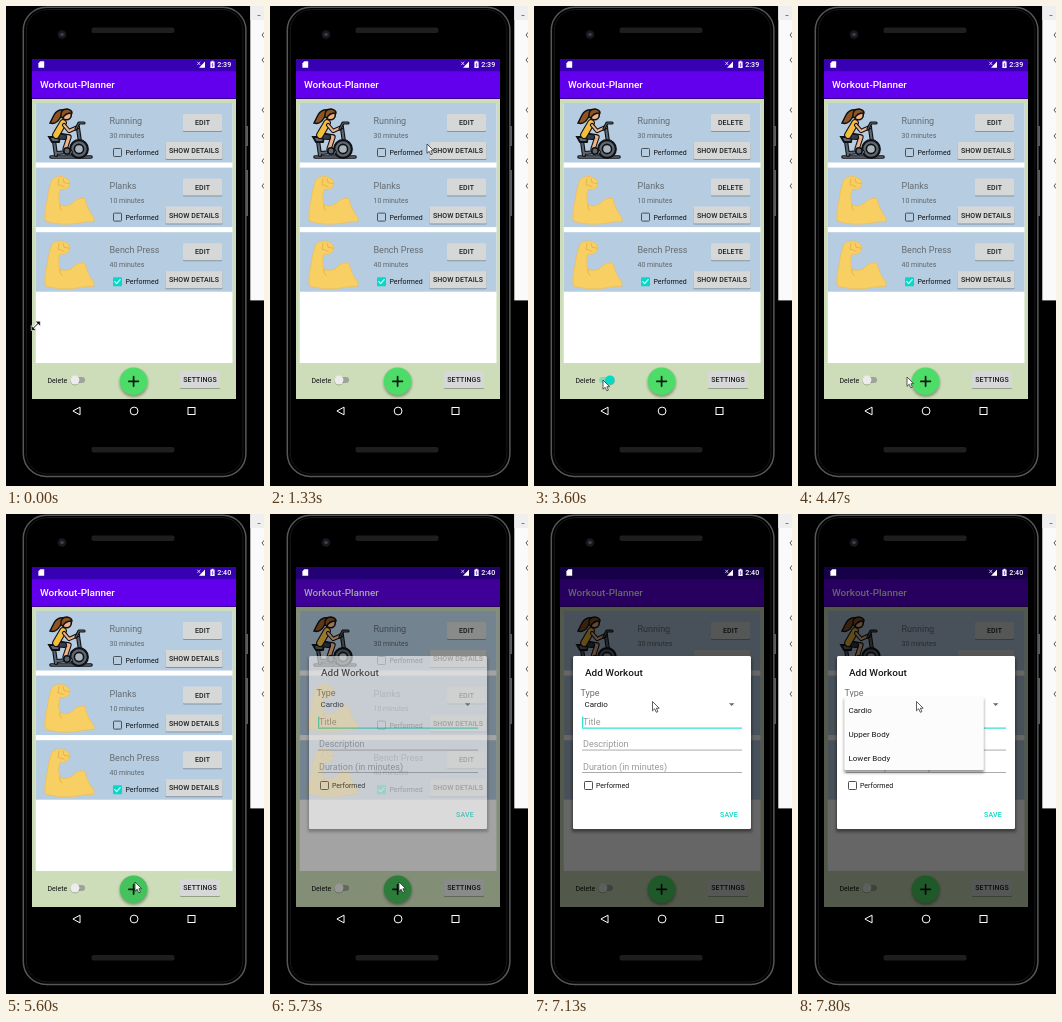
These frames come from a looping animation (258x480 px, 8000 ms). An HTML page:

```html
<!DOCTYPE html>
<html lang="en">
<head>
<meta charset="utf-8">
<title>Workout planner</title>
<style>
html, body { margin: 0; width: 100%; height: 100%; overflow: hidden; background: #000; }
svg { display: block; width: 100vw; height: 100vh; font-family: Roboto, "Open Sans", sans-serif; font-size: 7px; }
.med { font-weight: 500; }
.mid { text-anchor: middle; }
.line { fill: none; stroke-linecap: round; stroke-linejoin: round; }
.soft { filter: blur(1.6px); }
</style>
</head>
<body>
<svg id="stage" viewBox="0 0 258 480" preserveAspectRatio="none"></svg>
<script>
const LOOP = 8000, ROW = 64.6, TEAL = '#03dac5';
const stage = document.getElementById('stage');

const rect = (x, y, w, h, fill, more = '') =>
  `<rect x="${x}" y="${y}" width="${w}" height="${h}" fill="${fill}" ${more}/>`;
const circle = (x, y, r, fill, more = '') =>
  `<circle cx="${x}" cy="${y}" r="${r}" fill="${fill}" ${more}/>`;
const path = (d, fill, more = '') => `<path d="${d}" fill="${fill}" ${more}/>`;
const line = (d, color, w) => path(d, 'none', `class="line" stroke="${color}" stroke-width="${w}"`);
const text = (x, y, s, fill = '#111', size = 7, more = '') =>
  `<text x="${x}" y="${y}" fill="${fill}" font-size="${size}" ${more}>${s}</text>`;
const group = (id, body, more = '') => `<g id="${id}" ${more}>${body}</g>`;

function button(x, y, w, label, cls = '') {
  return rect(x, y + 0.8, w, 17.2, '#000', 'rx="1" opacity=".28"') +
    rect(x, y, w, 17, '#d6d7d7', 'rx="1"') +
    text(x + w / 2, y + 11.1, label, '#1c1c1c', 7, `class="med mid ${cls}" letter-spacing=".08"`);
}

function checkbox(x, y, s, on) {
  return on
    ? rect(x, y, s, s, TEAL, 'rx="1"') +
      line(`M${x + 1.8} ${y + s / 2}l1.8 2 3.6-4`, '#fff', 1.1)
    : rect(x + .5, y + .5, s - 1, s - 1, 'none', 'rx=".8" stroke="#4c5054"');
}

// Woman on an exercise bike
function bike() {
  const K = '#101114', SKIN = '#efb388', STEEL = '#5d6873';
  const limb = (d, c, w) => line(d, K, w + 2.2) + line(d, c, w);
  return limb('M45 151H85', STEEL, 1.4) +
    limb('M50 149L48 135M51 147L62 146L74 136L72 122', STEEL, 2) +
    circle(73, 143, 8.8, STEEL, `stroke="${K}" stroke-width="2.2"`) +
    circle(73, 143, 4.6, '#a9b4be', `stroke="${K}" stroke-width="1.6"`) +
    path('M43 131H54L53 136H46Z', STEEL, `stroke="${K}" stroke-width="1.8"`) +
    limb('M51 129L63 131L59 143L64 146', SKIN, 3.2) +
    limb('M50 130L58 131', '#343d48', 4) +
    limb('M57 117L50 129', '#f4bd3d', 5.5) +
    limb('M58 119L63 125L72 121', SKIN, 2) +
    limb('M70 123L73 117L78 117', STEEL, 1) +
    path('M59 104Q51 103 48 109L44 117Q50 119 54 112Z', '#8f5420', `stroke="${K}" stroke-width="1.5"`) +
    circle(60.5, 109, 4.8, SKIN, `stroke="${K}" stroke-width="1.6"`) +
    path('M55 111Q54 103 61 103Q66 104 66 107Q59 107 57 112Z', '#8f5420', `stroke="${K}" stroke-width="1.5"`) +
    circle(61, 145, 3.2, STEEL, `stroke="${K}" stroke-width="1.6"`);
}

// Flexed arm: fist at the top, elbow lower left, shoulder on the right
function arm() {
  return path('M46 109Q50 105 57 106Q63 108 64 113Q63 118 58 119L54 119Q51 127 54 134' +
    'Q59 137 66 133Q72 126 79 128Q81 139 88 147V151Q78 151 70 153Q52 155 39 150.5' +
    'Q38 142 41 130Q43 116 46 109Z', '#f8cf63', 'stroke="#efbe55" stroke-width=".7"') +
    line('M53 108L52 114L58 116M57 108L58 112L63 113M54 134Q53 138 56 140', '#e3ac4a', .8);
}

function card(i, name, mins, done) {
  return `<g transform="translate(0 ${i * ROW})">` +
    rect(29.7, 97, 196.8, 59.5, '#b5cce1') +
    (i ? arm() : bike()) +
    text(103.5, 118, name, '#666c72', 9) +
    text(103.5, 132, mins + ' minutes', '#61676c') +
    checkbox(107, 142, 9, done) +
    text(119.5, 149, 'Performed') +
    button(177, 108, 39, 'EDIT', 'action') +
    button(159.5, 136, 57, 'SHOW DETAILS') + '</g>';
}

function device() {
  const grille = y => rect(85.5, y, 83, 5.5, '#1d1e20', 'rx="2"');
  return rect(0, 0, 258, 480, '#000') +
    rect(240, 120, 2, 20, '#5a5c5f') + rect(240, 164, 2, 46, '#5a5c5f') +
    rect(17.3, 1.2, 222.6, 469.3, '#000', 'rx="23" stroke="#55575a" stroke-width="1.5"') +
    rect(20.3, 3.5, 216.6, 464.5, '#000', 'rx="21" stroke="#17181a"') +
    grille(21.5) + grille(441) +
    circle(56, 28.5, 4.3, '#17191c') + circle(56, 28.5, 1.8, '#39404f') +
    rect(244.3, 0, 13.7, 294.4, '#fafafa') + rect(244.3, 0, 13.7, 14, '#efefef') +
    line('M252 9.5H254', '#777', 1) +
    [29, 54, 104, 130, 155, 180].map(y => line(`M258 ${y - 2.5}L256 ${y}L258 ${y + 2.5}`, '#555', 1)).join('');
}

function statusIcons() {
  return path('M34.3 55.3H38.2V61.8H32.4V57.3Z', '#fff') +
    path('M193 61.8L199 55.5V61.8Z', '#fff') + line('M191.5 56L194 58.8M194 56L191.5 58.8', '#fff', .7) +
    rect(204.4, 55.6, 4.2, 6.4, '#fff') + rect(205.5, 54.8, 2, 1, '#fff') +
    line('M206.9 57L206 59H207.2L206.3 60.8', '#3700b3', .6) +
    text(211.2, 61.3, '2:39', '#fff', 7.1, 'id="clock" class="med"');
}

function app() {
  return rect(26, 53, 204, 364, '#000') +
    rect(26, 93, 204, 300, '#cdddb9') +
    rect(26, 65, 204, 27.6, '#6200ee') + rect(26, 53, 204, 12.2, '#3700b3') +
    text(34, 82.3, 'Workout-Planner', '#fff', 9.95, 'class="med"') +
    rect(29.7, 97, 196.8, 260, '#fff') +
    card(0, 'Running', 30) + card(1, 'Planks', 10) + card(2, 'Bench Press', 40, true) +
    text(41.5, 377, 'Delete') +
    circle(69, 374, 10, '#8a958a', 'id="ripple"') +
    rect(65, 371, 14, 6, '#9da397', 'id="track" rx="3"') +
    group('thumb', circle(69, 374.7, 4.8, '#000', 'opacity=".25"') + circle(69, 374, 4.6, '#ececec', 'id="knob"')) +
    circle(127.7, 377, 14, '#000', 'class="soft" opacity=".35"') +
    circle(127.6, 375.3, 13.8, '#4ddc68', 'id="fab"') +
    line('M122.8 375.3H132.4M127.6 370.5V380.1', '#101510', 1.7) +
    button(174, 365, 40, 'SETTINGS') +
    line('M73.7 401.3L66.9 405L73.7 408.7Z', '#fff', 1) +
    circle(128.1, 405, 3.9, 'none', 'stroke="#fff"') +
    rect(182, 401.5, 7, 7, 'none', 'stroke="#fff"');
}

function dialog() {
  const field = (y, hint) => text(49, y, hint, '#999', 9) + rect(48, y + 2.4, 160, .7, '#888');
  return rect(38, 144, 180, 174, '#000', 'class="soft" opacity=".4"') +
    rect(39, 142, 178, 173, '#fff', 'rx="1.5"') +
    text(51, 162, 'Add Workout', '#171717', 9.95, 'class="med"') +
    text(46.5, 182, 'Type', '#707070', 9) +
    text(50.5, 193, 'Cardio', '#171717', 8) +
    path('M195 189.2H200.4L197.7 192Z', '#666') +
    text(49, 211, 'Title', '#999', 9) + rect(48, 213.6, 160, 1, TEAL) +
    rect(48.2, 202.5, 1, 11, TEAL, 'id="caret"') +
    field(233.3, 'Description') + field(255.8, 'Duration (in minutes)') +
    checkbox(50, 267, 9) + text(62, 274, 'Performed') +
    text(186, 303, 'SAVE', TEAL, 7, 'class="med" letter-spacing=".2"');
}

function menu() {
  return rect(46, 185, 140, 74, '#000', 'class="soft" opacity=".38"') +
    rect(46.3, 183, 139.5, 73, '#fcfcfc', 'rx="1"') +
    ['Cardio', 'Upper Body', 'Lower Body'].map((s, i) => text(50.5, 199.1 + i * 24, s, '#171717', 8)).join('');
}

stage.innerHTML = device() + app() +
  rect(26, 53, 204, 340, '#000', 'id="dim"') + statusIcons() +
  group('dialog', dialog()) + group('menu', menu()) +
  group('resize', line('M26.5 323L33 316.5', '#fff', 2.6) +
    path('M29.2 315.2H34.3V320.3ZM25.2 319.4V324.5H30.3Z', '#111', 'stroke="#fff" stroke-width=".6"') +
    line('M27 322.5L32.5 317', '#111', 1)) +
  group('pointer', path('M0 0V9.3L2.2 7.3L3.8 10.8L5.4 10.1L3.9 6.7H6.7Z', '#fff', 'stroke="#2a2a2a" stroke-width=".75"'));

// Steps: [time, value...]; each holds until the next
const MOVES = [
  [0, 32, 308], [670, 50, 285], [800, 110, 225], [930, 146, 187], [1200, 152, 160], [1330, 157, 138],
  [1470, 154, 200], [1600, 136, 320], [1730, 125, 399], [1870, 122, 391], [2000, 115, 378],
  [2130, 104, 367], [2200, 96, 366], [2330, 108, 373], [2470, 92, 376], [2600, 76, 376], [2730, 69, 374],
  [4470, 109, 371], [4600, 125, 374], [4730, 142, 372], [4870, 134, 370], [5000, 129, 368],
  [6270, 128, 340], [6400, 121, 262], [6530, 117, 201], [6670, 116, 193], [6800, 118.5, 187.5]
];
const THUMB = [[0, 0], [3200, 3], [3330, 7], [4070, 4], [4200, 0]];
const RIPPLE = [[0, 0], [3070, .06], [3200, .2], [3330, .15], [3470, .07], [3600, 0], [3930, .2], [4200, .12], [4330, 0]];
const FAB = [[0, '#4ddc68'], [5330, '#48cd61'], [5470, '#44c25b'], [6130, '#4ddc68']];
const DIALOG = [[0, 0], [5730, .6], [5870, 1]];
const CARET = [[0, 1], [6400, 0], [7130, 1]];
const MENU = [[0, 0], [7400, .45], [7530, .9], [7670, 1]];

function at(steps, t) {
  let hit = steps[0];
  for (const s of steps) if (s[0] <= t) hit = s;
  return hit.slice(1);
}

const $ = id => document.getElementById(id);
const set = (id, name, value) => $(id).setAttribute(name, value);
const actions = document.querySelectorAll('.action');

function draw(t) {
  const [x, y] = at(MOVES, t), [slide] = at(THUMB, t), [open] = at(DIALOG, t);
  const arrow = t >= 530, deleting = t >= 3200 && t < 3930;
  set('pointer', 'transform', `translate(${x} ${y})`);
  set('pointer', 'opacity', arrow ? 1 : 0);
  set('resize', 'opacity', arrow ? 0 : 1);
  set('thumb', 'transform', `translate(${slide} 0)`);
  set('knob', 'fill', slide > 3 ? TEAL : '#ececec');
  set('track', 'fill', slide > 3 ? '#80d9bd' : '#9da397');
  set('ripple', 'opacity', at(RIPPLE, t)[0]);
  set('fab', 'fill', at(FAB, t)[0]);
  set('dim', 'opacity', open * .6);
  set('dialog', 'opacity', open);
  set('caret', 'opacity', at(CARET, t)[0]);
  set('menu', 'opacity', at(MENU, t)[0]);
  $('clock').textContent = t < 5330 ? '2:39' : '2:40';
  actions.forEach(a => { a.textContent = deleting ? 'DELETE' : 'EDIT'; });
}

const start = performance.now();
function tick(now) {
  draw(Math.max(0, now - start) % LOOP);
  requestAnimationFrame(tick);
}
draw(0);
requestAnimationFrame(tick);
</script>
</body>
</html>
```
